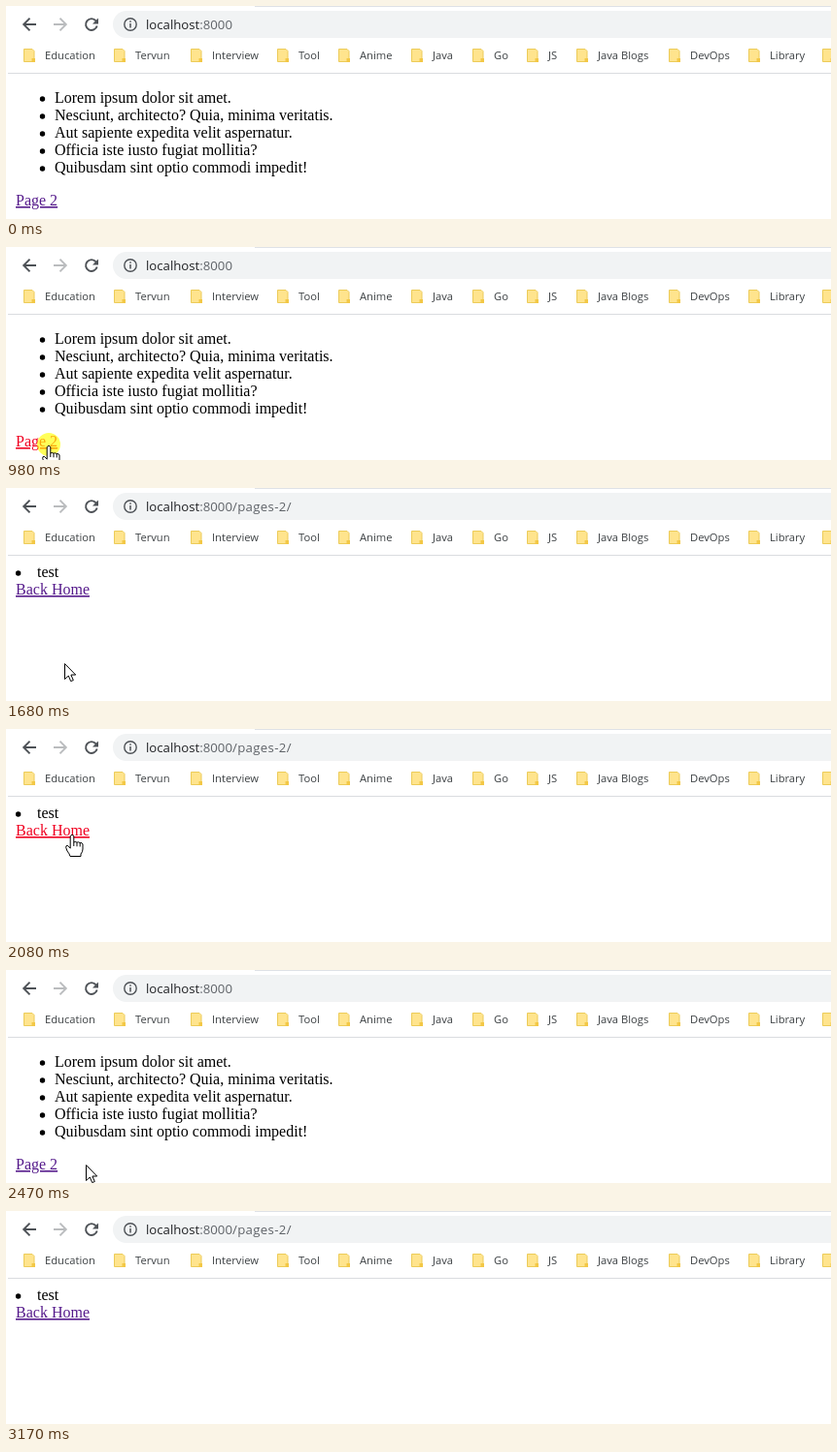
An HTML page that plays this animation: 849 px wide and 220 px high, repeating every 3960 ms.

```html
<!DOCTYPE html>
<html lang="en">
<head>
<meta charset="utf-8">
<title>Browser navigation</title>
<style>
  html, body { margin: 0; width: 100%; height: 100%; overflow: hidden; background: #fff; }
  svg { display: block; width: 100%; height: 100%; }
  .ui { font-family: "Open Sans", "Noto Sans", sans-serif; }
  .url { font-size: 13.2px; fill: #202124; }
  .rest { fill: #5f6368; }
  .path { letter-spacing: .35px; }
  .bookmark { font-size: 11.2px; fill: #3c4043; }
  .page { font: 16px "Liberation Serif", serif; }
  .link { fill: #551a8b; text-decoration: underline; }
  .pressed .link { fill: #f00020; }
  .icon { fill: none; stroke: #4d5156; stroke-width: 1.9; }
  .cursor { fill: #fff; stroke: #000; stroke-linejoin: round; }
</style>
</head>
<body>
<svg id="stage" viewBox="0 0 849 220">
  <defs>
    <g id="folder">
      <path d="M.5 .5h8.5l2 2v11H.5z" fill="#ffe48d" stroke="#eccb58"/>
      <path d="M8.5 10h3.5v4H8.5z" fill="#f3c846"/>
    </g>
    <path id="back" d="M31 19H18.5M24.5 12.7L18.2 19l6.3 6.3"/>
  </defs>

  <path d="M256 .5H849" stroke="#dee1e6"/>
  <path d="M2 69.5H849" stroke="#dadce0"/>
  <rect x="110" y="5" width="780" height="28" rx="14" fill="#f1f3f4"/>
  <use href="#back" class="icon"/>
  <use href="#back" class="icon" transform="matrix(-1 0 0 1 80 0)" style="stroke:#babcbe"/>
  <path class="icon" d="M92.6 15.4A5.9 5.9 0 1 0 93.7 20.5"/>
  <path d="M95 12.5v6h-6z" fill="#4d5156"/>
  <circle class="icon" cx="128" cy="19" r="6.2" style="stroke-width:1.4"/>
  <path d="M128 15.2v1.6M128 18v4.6" stroke="#4d5156" stroke-width="1.5"/>
  <text class="ui url" x="144" y="24">localhost<tspan class="rest">:8000<tspan class="path" id="route"></tspan></tspan></text>
  <g id="bookmarks" class="ui bookmark"></g>

  <g id="home" class="page">
    <g id="list"></g>
    <text class="link" x="10" y="206">Page 2</text>
  </g>
  <g id="second" class="page">
    <circle cx="12.6" cy="88" r="2.7"/>
    <text x="32" y="92">test</text>
    <text class="link" x="10" y="110">Back Home</text>
  </g>

  <g id="pointer">
    <circle id="halo" r="12" cy="-1" fill="#ff0" opacity=".65"/>
    <path id="arrow" class="cursor" d="M.5 .5V16.5L4.3 13 6.7 18.6 9.3 17.5 6.9 12H11.7z"/>
    <g id="hand" class="cursor">
      <path d="M-1.8 1.5q1.8-2.6 3.6 0V8q1.2-1.2 3.2 .2q1.4-1 3.2 .4q2.2-.6 2.8 1.4V15q0 3-2 5V22.5H-2q-.5-2.5-3-5.5l-1.3-3.6q-.3-2.6 2-1.9l2.5 2.7z"/>
      <path d="M1.8 8v4M5 8.3v4M8.2 8.8v3.7"/>
    </g>
  </g>
</svg>
<script>
const LOOP = 3960;
const $ = id => document.getElementById(id);

const bookmarks = [
  [40, "Education"], [133, "Tervun"], [212, "Interview"], [301, "Tool"],
  [364, "Anime"], [439, "Java"], [502, "Go"], [558, "JS"],
  [609, "Java Blogs"], [704, "DevOps"], [786, "Library"], [862, ""]
];
const items = [
  "Lorem ipsum dolor sit amet.",
  "Nesciunt, architecto? Quia, minima veritatis.",
  "Aut sapiente expedita velit aspernatur.",
  "Officia iste iusto fugiat mollitia?",
  "Quibusdam sint optio commodi impedit!"
];
$("bookmarks").innerHTML = bookmarks.map(([x, label]) =>
  `<use href="#folder" x="${x - 22}" y="44"/><text x="${x}" y="55">${label}</text>`).join("");
$("list").innerHTML = items.map((label, i) =>
  `<circle cx="37.5" cy="${96 + 18 * i}" r="2.7"/><text x="50" y="${100 + 18 * i}">${label}</text>`).join("");

// Pointer strokes: quadratic curves sampled in a fixed number of steps.
const strokes = [
  { start: 290, end: 750, steps: 7, curve: [[100, 216], [86, 209], [69, 207]] },
  { start: 830, end: 1070, steps: 4, curve: [[50, 206], [40, 204], [36, 204]] },
  { start: 1530, end: 2000, steps: 7, curve: [[40, 200], [110, 140], [68, 109]] },
  { start: 2150, end: 2470, steps: 5, curve: [[68, 109], [70, 160], [82, 201]] },
  { start: 2550, end: 2850, steps: 5, curve: [[78, 205], [62, 210], [48, 203]] },
  { start: 3010, end: 3100, steps: 2, curve: [[80, 203], [130, 203], [179, 203]] }
];
const spans = {
  second: [[990, 2150], [3010, LOOP]],
  hand: [[830, 1070], [2000, 2230], [2780, 3010]],
  pressed: [[910, 990], [2080, 2150], [2930, 3010]],
  halo: [[910, 990], [2930, 3010]],
  pointer: [[290, 3170]]
};

const during = (name, t) => spans[name].some(([from, to]) => t >= from && t < to);
const show = (id, visible) => { $(id).style.display = visible ? "" : "none"; };

function pointerAt(t) {
  const { start, end, steps, curve: [a, b, c] } =
    strokes.findLast(stroke => t >= stroke.start) || strokes[0];
  const last = steps - 1;
  const progress = Math.max(0, Math.min(1, (t - start) / (end - start)));
  const p = Math.floor(progress * last + .001) / last, q = 1 - p;
  return [0, 1].map(i => Math.round(q * q * a[i] + 2 * p * q * b[i] + p * p * c[i]));
}

function draw(now) {
  const t = now % LOOP;
  const second = during("second", t), hand = during("hand", t);
  show("second", second);
  show("home", !second);
  $("route").textContent = second ? "/pages-2/" : "";
  $("stage").classList.toggle("pressed", during("pressed", t));
  show("pointer", during("pointer", t));
  show("hand", hand);
  show("arrow", !hand);
  show("halo", during("halo", t));
  $("pointer").setAttribute("transform", `translate(${pointerAt(t)})`);
}

const begin = performance.now();
function tick() {
  draw(performance.now() - begin);
  requestAnimationFrame(tick);
}
tick();
</script>
</body>
</html>
```
